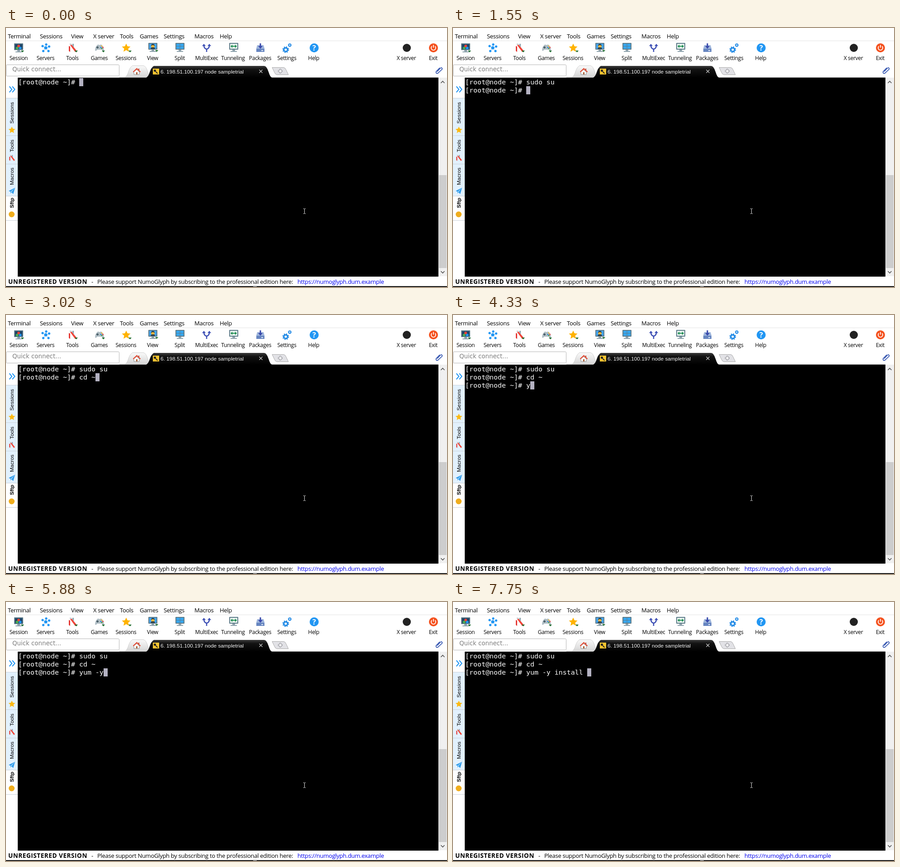
An HTML page for the animation above (8 s loop, 976 by 574 pixels).

```html
<!DOCTYPE html>
<html lang="en">
<head>
<meta charset="utf-8">
<title>Terminal session</title>
<style>
  html, body { margin: 0; width: 100%; height: 100%; overflow: hidden; background: #fff; }
  svg { display: block; width: 976px; height: 574px; }
  text { white-space: pre; }
  .ui { font: 13px "Open Sans", sans-serif; letter-spacing: -.29px; }
  .ui .strong { font-size: 13.5px; font-weight: 700; letter-spacing: .57px; }
  .tool { font-size: 12px; text-anchor: middle; }
  .side { font: 11.8px "Liberation Sans", Arial, sans-serif; }
  .shell { font: 14.95px "DejaVu Sans Mono", monospace; fill: #fff; }
</style>
</head>
<body>
<svg viewBox="0 0 976 574" xmlns="http://www.w3.org/2000/svg">
  <defs>
    <linearGradient id="darkTab" x2="0" y2="1">
      <stop stop-color="#3c3c3c"/><stop offset=".3" stop-color="#121212"/><stop offset="1"/>
    </linearGradient>
    <linearGradient id="lightTab" x2="0" y2="1">
      <stop stop-color="#fafafa"/><stop offset="1" stop-color="#d4d4d4"/>
    </linearGradient>
    <path id="star" d="M0-9.5 2.8-3.4 9.5-2.7 4.5 1.8 5.9 8.5 0 5.1-5.9 8.5-4.5 1.8-9.5-2.7-2.8-3.4Z"/>
    <path id="more" d="M5 6h7l-3.5 4Z" fill="#1c6b2c"/>
    <g id="monitor">
      <rect x="-10" y="-10" width="20" height="15" rx="1" fill="#607d8b"/>
      <path d="M-3 5h6v3h4v2H-7V8h4Z" fill="#90a4ae"/>
    </g>
    <g id="knife">
      <path d="M-7-9-3-10 8 4 5 6Z" fill="#cfd8dc"/>
      <path d="M0-9 3-9V-1L0-5Z" fill="#90a4ae"/>
      <path d="M-5-6-2-7 9 6Q9 9 6 9Z" fill="#f44336"/>
      <path d="M-8-4-8 7-5 9-5-3Z" fill="#e53935"/>
    </g>
    <g id="gear" fill="none" stroke="#1e88e5">
      <circle r="4.1" stroke-width="3"/>
      <circle r="6.2" stroke-width="2.2" stroke-dasharray="2.45 2.42"/>
    </g>
  </defs>

  <rect width="976" height="574" fill="#fff"/>
  <path d="M0 28.5H976" stroke="#e4e4e4"/>
  <g id="labels"></g>

  <!-- Toolbar icons -->
  <g transform="translate(28 44)">
    <use href="#monitor"/><rect x="-8" y="-8" width="16" height="11" fill="#1d4468"/>
    <circle cy="-4" r="3" fill="#f44336"/><circle cx="-3.4" cy=".4" r="3" fill="#4caf50"/><circle cx="3.4" cy=".4" r="3" fill="#2196f3"/>
    <use href="#more"/>
  </g>
  <g transform="translate(88 44)" fill="#2196f3" stroke="#8cc6f5">
    <path d="M0 0-7-4M0 0 1-8M0 0 8-3M0 0 6 7M0 0-5 7"/>
    <g stroke="none"><circle r="3.6"/><circle cx="-7" cy="-4" r="2.6"/><circle cx="1" cy="-7.5" r="2.6"/><circle cx="7.5" cy="-3" r="2.6"/><circle cx="6" cy="7" r="2.6"/><circle cx="-5.5" cy="7" r="2.6"/></g>
  </g>
  <g transform="translate(147 44)"><use href="#knife"/><use href="#more"/></g>
  <g transform="translate(207 44)">
    <path d="M-6-5Q-4-9 0-6Q4-9 6-5Q9-3 10 5Q9 9 5 4H-5Q-9 9-10 5Q-9-3-6-5Z" fill="#b0bec5"/>
    <path d="M-7-1h5M-4.5-3.500v5" stroke="#455a64" stroke-width="2"/>
    <circle cx="5" cy="-4" r="1.5" fill="#fbc02d"/><circle cx="7.5" cy="-1" r="1.5" fill="#e53935"/><circle cx="3" cy="-1" r="1.5" fill="#1e88e5"/><circle cx="5" cy="1.5" r="1.5" fill="#43a047"/>
    <use href="#more"/>
  </g>
  <g transform="translate(266 44)"><use href="#star" fill="#ffb300"/><use href="#more"/></g>
  <g transform="translate(325 43)">
    <use href="#monitor"/><rect x="-8" y="-8" width="16" height="11" fill="#42a5f5"/>
    <circle cy="-3" r="4" fill="#e3b341"/><path d="M-5 3Q-5 0 0 0T5 3Z" fill="#263238"/><path d="M-4-3Q-4-7.500 0-7.500T4-3L2-5H-2Z" fill="#263238"/>
    <use href="#more"/>
  </g>
  <g transform="translate(385 43)">
    <use href="#monitor"/><path d="M-8-8h7.500v5H-8ZM.5-8H8v5H.5ZM-8-2h7.500v5H-8ZM.5-2H8v5H.5Z" fill="#35a7f2"/>
  </g>
  <g transform="translate(444 44)" fill="none" stroke="#3f51b5" stroke-width="2.6">
    <path d="M0 9V3Q-6 1-6-5M0 3Q6 1 6-5"/><path d="M-10-4-6-9-2-4ZM2-4 6-9 10-4Z" fill="#3f51b5" stroke="none"/>
  </g>
  <g transform="translate(504 43)">
    <use href="#monitor"/><rect x="-8" y="-8" width="16" height="11" fill="#e7f3ee"/>
    <path d="M-7-2.500-3-6v2.500H3V-6L7-2.500 3 1V-1.500H-3V1Z" fill="#16894b"/>
  </g>
  <g transform="translate(563 44)">
    <path d="M-7-6H7L9 1V9H-9V1Z" fill="#9fb6dc"/><path d="M-9 2H9V9H-9Z" fill="#6685c0"/>
    <path d="M-1.500-10h3v6H5L0 2-5-4h3.500Z" fill="#3949ab"/><path d="M2 6h4" stroke="#dce7f5" stroke-width="2"/>
  </g>
  <use href="#gear" x="619" y="48"/>
  <use href="#gear" transform="translate(628 38) scale(.57)"/>
  <circle cx="682" cy="44" r="10" fill="#2196f3"/>
  <text x="682" y="50" text-anchor="middle" font-family="Open Sans, sans-serif" font-size="16" font-weight="700" fill="#fff">?</text>
  <circle cx="887" cy="44" r="9" fill="#222"/>
  <circle cx="946" cy="44" r="10" fill="#f4511e"/>
  <path d="M942.5 40.500a5 5 0 1 0 7 0M946 37.500v6" fill="none" stroke="#fff" stroke-width="1.8"/>

  <!-- Address field and tabs -->
  <path d="M251 109.500H957" stroke="#c4c4c4"/>
  <rect x=".5" y="81.5" width="250" height="25" rx="2" fill="#fff" stroke="#b5b5b5"/>
  <text x="14" y="96" font-family="DejaVu Sans, sans-serif" font-size="13.35" fill="#7d7d7d">Quick connect...</text>
  <path d="M263 109Q268 107 271 97T280 83.500H304Q310 84 314 98T322 109Z" fill="url(#lightTab)" stroke="#d0d0d0"/>
  <path d="M283 97v6h12v-6l-6-5Z" fill="#fff" stroke="#8a8a8a"/>
  <path d="M281.5 97.500 289.500 90l8 7.500" fill="none" stroke="#e64a32" stroke-width="2.2"/>
  <path d="M288 98h3v5h-3Z" fill="#a8623a"/><path d="M293 90h2v4l-2-2Z" fill="#b34a3a"/>
  <path d="M310 110Q315 108 318 98T327 84H571Q577 84 581 97T589 110Z" fill="url(#darkTab)"/>
  <rect x="325" y="90" width="14" height="13" fill="#f4c430"/>
  <path d="M330 95 336 101M333.5 98.500l-1.500 1.500" stroke="#222" stroke-width="1.6"/><circle cx="329.5" cy="94.5" r="2.5" fill="#222"/>
  <text x="342" y="101" font-family="Liberation Sans, Arial, sans-serif" font-size="11.75" fill="#f4f4f4">6. 198.51.100.197 node sampletrial</text>
  <path d="M560.5 92.500l7 7m0-7-7 7" stroke="#cfcfcf" stroke-width="1.2"/>
  <path d="M589 87.500H614Q618 87.500 620 93L625 103.500H600Q596 103.500 594 98Z" fill="#e2e2e6" stroke="#aaa"/>
  <path d="M605.5 91h3v3h3v3h-3v3h-3v-3h-3v-3h3Z" fill="#fff" stroke="#8b8b93"/>
  <path d="M954.5 96.500 961 89.500Q963.500 87 965 89T964 92.500L956 100Q953 102 952 99.500T953 95.500L960 88" fill="none" stroke="#3455b0" stroke-width="1.7"/>

  <!-- Sidebar -->
  <path d="M7.5 129.500 13 136 7.500 142.500M14 129.500 19.500 136 14 142.500" fill="none" stroke="#2196f3" stroke-width="2"/>
  <rect y="155" width="26" height="217" fill="#e2f1fd"/>
  <path d="M0 155.500H26M0 238.500H26M0 301.500H26M0 372.500H26M0 426.500H26" stroke="#cbd3d9"/>
  <g class="side">
    <text transform="translate(17 212) rotate(-90)">Sessions</text>
    <text transform="translate(17 275) rotate(-90)">Tools</text>
    <text transform="translate(17 348) rotate(-90)">Macros</text>
    <text transform="translate(17 399) rotate(-90)" font-weight="700">Sftp</text>
  </g>
  <use href="#star" transform="translate(13 226) scale(.78)" fill="#fbb912"/>
  <use href="#knife" transform="translate(13 288) scale(.72)"/>
  <path d="M6 361 20 354 16 368 12 364 10 367 10 363Z" fill="#2d9bea"/><path d="M10 363 20 354 12 364Z" fill="#a5d5f8"/>
  <circle cx="12.5" cy="413" r="6.5" fill="#f0ad1c"/>

  <!-- Shell -->
  <rect x="26" y="110" width="931" height="441"/>
  <g id="shell" class="shell"></g>
  <rect id="caret" width="9" height="18" fill="#b4b2c2"/>
  <path d="M658 400.500h2m1 0h2M660.5 401v10M658 411.500h2m1 0h2" stroke="#e8e8e8"/>
  <rect x="957" y="110" width="19" height="440" fill="#f0f0f0"/>
  <rect x="958" y="326" width="17" height="206" fill="#cdcdcd"/>
  <path d="M962.5 122 966.500 118 970.500 122M962.5 539 966.500 543 970.500 539" fill="none" stroke="#505050" stroke-width="1.6"/>

  <!-- Status line -->
  <g class="ui">
    <text class="strong" x="5" y="567">UNREGISTERED VERSION</text>
    <text x="189" y="567">-</text>
    <text x="202" y="567">Please support NumoGlyph by subscribing to the professional edition here:</text>
    <text x="645" y="567" fill="#00e">https://numoglyph.dum.example</text>
  </g>
  <rect y="572" width="976" height="2" fill="#111"/>
  <rect x="547" y="573" width="8" height="1" fill="#ddd"/>
</svg>
<script>
const $ = id => document.getElementById(id);

function addText(parent, className, x, y, content = "") {
  const node = document.createElementNS("http://www.w3.org/2000/svg", "text");
  node.setAttribute("class", className);
  node.setAttribute("x", x);
  node.setAttribute("y", y);
  node.textContent = content;
  return parent.appendChild(node);
}

const menu = [["Terminal", 4], ["Sessions", 75], ["View", 144], ["X server", 193], ["Tools", 252],
  ["Games", 296], ["Settings", 349], ["Macros", 417], ["Help", 473]];
const tools = [["Session", 28], ["Servers", 87.5], ["Tools", 147], ["Games", 206.5], ["Sessions", 265.5],
  ["View", 324.5], ["Split", 384.5], ["MultiExec", 444], ["Tunneling", 502.5], ["Packages", 562.5],
  ["Settings", 621.5], ["Help", 681], ["X server", 886], ["Exit", 945.5]];
menu.forEach(([label, x]) => addText($("labels"), "ui", x, 23, label));
tools.forEach(([label, x]) => addText($("labels"), "ui tool", x, 71, label));

const LOOP = 8000, CELL = 9, ROW = 18, LEFT = 27, TOP = 111;
const PROMPT = "[root@node ~]# ";
const typed = "sudo su\ncd ~\nyum -y install ";
const keyTimes = [
  80, 150, 220, 400, 700, 1000, 1150, 1550,
  2330, 2390, 2640, 3020, 3490,
  4330, 4490, 4720, 4950, 5180, 5880, 6200,
  6590, 6650, 6820, 6960, 7130, 7440, 7670, 7750
];
const rows = [0, 1, 2].map(i => addText($("shell"), "shell", LEFT, TOP + 14 + i * ROW));
const start = performance.now();
let shown = -1;

function draw() {
  const time = (performance.now() - start) % LOOP;
  const count = keyTimes.filter(t => t <= time).length;
  if (count !== shown) {
    shown = count;
    const lines = typed.slice(0, count).split("\n").map(line => PROMPT + line);
    rows.forEach((row, i) => { row.textContent = lines[i] || ""; });
    const last = lines.length - 1;
    $("caret").setAttribute("x", LEFT + lines[last].length * CELL);
    $("caret").setAttribute("y", TOP + last * ROW);
  }
  requestAnimationFrame(draw);
}
draw();
</script>
</body>
</html>
```
